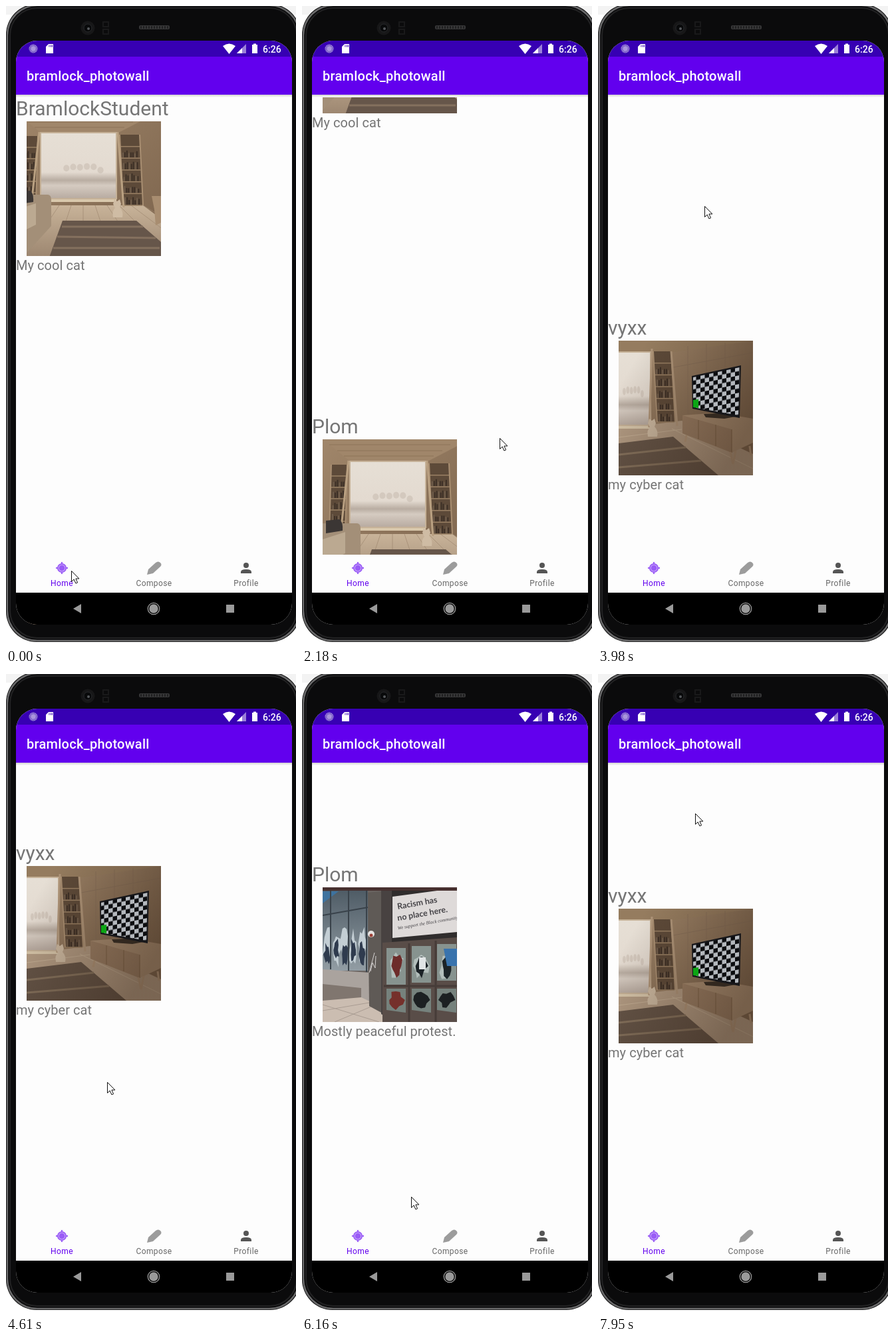
An HTML page that plays this animation: 436x960 px, repeating every 8000 ms.

```html
<!DOCTYPE html>
<html lang="en">
<head>
<meta charset="utf-8">
<title>Photo feed</title>
<style>
  html, body { margin: 0; width: 100%; height: 100%; overflow: hidden; background: #fff; }
  svg { display: block; width: 100vw; height: 100vh; }
  text { font-family: Roboto, sans-serif; }
  .user { font-size: 30px; fill: #757575; }
  .caption { font-size: 20px; letter-spacing: .06px; fill: #757575; }
  .tab { font-size: 12px; letter-spacing: .4px; text-anchor: middle; fill: #666; }
  .sign { font-family: Lato, sans-serif; font-weight: 700; font-size: 12.4px; fill: #454347; }
  .small { font-family: "Liberation Serif", serif; font-style: italic; font-size: 7px; fill: #454347; }
</style>
</head>
<body>
<svg viewBox="0 0 436 960" xmlns="http://www.w3.org/2000/svg">
  <defs>
    <linearGradient id="shade" x2="0" y2="1">
      <stop stop-color="#d0d0d0"/><stop offset="1" stop-color="#fdfdfd"/>
    </linearGradient>
    <linearGradient id="view" x2="0" y2="1">
      <stop stop-color="#e6dfd5"/><stop offset=".6" stop-color="#e3dad0"/>
      <stop offset=".72" stop-color="#b9ada2"/><stop offset=".8" stop-color="#d5cbc1"/>
      <stop offset="1" stop-color="#b7aaa0"/>
    </linearGradient>
    <linearGradient id="wood" x2="1" y2="1">
      <stop stop-color="#a0866a"/><stop offset="1" stop-color="#7b634c"/>
    </linearGradient>
    <linearGradient id="floor" x2="0" y2="1">
      <stop stop-color="#c8b399"/><stop offset="1" stop-color="#9c8670"/>
    </linearGradient>
    <linearGradient id="dusk" x2="1" y2=".6">
      <stop offset=".15" stop-color="#2b1a0e" stop-opacity="0"/><stop offset="1" stop-color="#2b1a0e" stop-opacity=".42"/>
    </linearGradient>
    <linearGradient id="glass" x2="0" y2="1">
      <stop stop-color="#4f5c66"/><stop offset="1" stop-color="#929da4"/>
    </linearGradient>
    <pattern id="checks" width="13" height="13" patternUnits="userSpaceOnUse" patternTransform="matrix(1 -.21 0 1 110 54)">
      <path fill="#0b0c0f" d="M0 0h13v13H0z"/><path fill="#b4b8bd" d="M0 0h6.5v6.5H0zM6.5 6.5H13V13H6.5z"/>
    </pattern>
    <clipPath id="screen"><rect x="15" y="52" width="415" height="876" rx="32"/></clipPath>
    <clipPath id="photo"><rect width="202" height="202"/></clipPath>
  </defs>

  <path fill="#f3f3f3" d="M0 0h436v13H0z"/>
  <rect y="-3" width="443" height="957" rx="46" fill="#111"/>
  <rect x="2" y="-1" width="439" height="953" rx="45" fill="#0b0b0c" stroke="#6a6a6b" stroke-width="2.500"/>
  <rect x="6" y="3" width="431" height="945" rx="41" fill="none" stroke="#222223" stroke-width="2"/>
  <circle cx="123" cy="33" r="10.500" fill="#171718"/>
  <circle cx="123" cy="33" r="6" fill="#08090a" stroke="#28292c"/>
  <circle cx="124" cy="34" r="2" fill="#55585c"/>
  <path fill="none" stroke="#19191a" stroke-width="2" d="M146 24h8v7h-8zM146 35h8v7h-8z"/>
  <rect x="200" y="29" width="46" height="6" rx="2" fill="#373738"/>
  <path stroke="#202021" stroke-dasharray="2 2" d="M202 32h42" stroke-width="4"/>

  <g clip-path="url(#screen)">
    <path fill="#fdfdfd" d="M15 52h415v876H15z"/>
    <g id="feed"></g>
    <path fill="url(#shade)" d="M15 133h415v4H15z"/>
    <path fill="#3700b3" d="M15 52h415v24H15z"/>
    <path fill="#6200ee" d="M15 76h415v57H15z"/>
    <path fill="#fdfdfd" d="M15 823h415v57H15z"/>
    <path d="M15 880h415v48H15z"/>

    <circle cx="41" cy="64" r="6.500" fill="#a995dc"/>
    <circle cx="41" cy="64" r="5" fill="none" stroke="#5b35bd" stroke-dasharray="1 1.2" stroke-width="3"/>
    <path fill="#fff" d="M64 57h7v14H60V61z"/>
    <path stroke="#3700b3" d="M65 58.500v3M67.500 58.500v3M69.500 58.500v3"/>
    <path fill="#fff" d="M326 60q9.500-7 19 0l-9.500 12zM370 58h2v-1.500h4V58h2v13h-8z"/>
    <path fill="#9b80d9" d="M361 57v14h-14z"/><path fill="#fff" d="M355 63v8h-8z"/>
    <text x="386" y="69.500" font-size="14" font-weight="500" fill="#fff">6:26</text>
    <text x="31" y="112" font-size="20" font-weight="500" letter-spacing=".25" fill="#fff">bramlock_photowall</text>

    <g fill="none" stroke="#9a5cf6">
      <path stroke-width="2" d="M84 834v18M75 843h18"/>
      <circle cx="84" cy="843" r="6.200" fill="#c9a9fb" stroke-width="1.800"/>
      <circle cx="84" cy="843" r="4.300" fill="#9a5cf6" stroke="none"/>
    </g>
    <path fill="#9c9c9c" d="M212 853l2-8 11-10q4-3 7 0t0 6l-11 10z"/>
    <circle cx="361" cy="839" r="4" fill="#555"/>
    <path fill="#555" d="M353 851v-2q0-4 8-4t8 4v2z"/>
    <text class="tab" x="84" y="869.500" style="fill:#6200ee">Home</text>
    <text class="tab" x="222.500" y="869.500">Compose</text>
    <text class="tab" x="361" y="869.500">Profile</text>

    <path fill="#9a9a9a" d="M113 897v14l-12-7zM331 898h12v12h-12z"/>
    <circle cx="222" cy="904" r="6.700" fill="#9a9a9a"/>
    <circle cx="222" cy="904" r="8.700" fill="none" stroke="#9a9a9a" stroke-width="1.300"/>
  </g>
  <path id="cursor" fill="#fff" stroke="#111" d="M.5.500v16l3.700-3.500 2.700 6 2.700-1.100-2.700-5.900h5z"/>
</svg>
<script>
const shape = (d, fill, extra = '') => `<path d="${d}" fill="${fill}" ${extra}/>`;
const lines = (d, color, width = 1) => shape(d, 'none', `stroke="${color}" stroke-width="${width}"`);
const repeat = (n, make) => Array.from({ length: n }, (_, i) => make(i)).join('');
const random = seed => Math.abs(Math.sin(seed * 127.1) * 437.5) % 1;

function bookcase(x, y, w, h, lean) {
  const rows = 6, gap = h / rows;
  const shelf = r => {
    const left = x + lean * r / rows, base = y + (r + 1) * gap;
    const book = b => {
      const tall = gap * (.4 + .3 * random(r * 9 + b));
      return shape(`M${left + 3 + b * 3} ${base - tall}h2v${tall - 1}h-2z`, b % 3 ? '#3d3027' : '#6e5c4b');
    };
    return (r ? repeat(Math.floor(w / 3) - 2, book) : '') + lines(`M${left} ${base}h${w}`, '#9a8064', 1.5);
  };
  return shape(`M${x} ${y}h${w}l${lean} ${h}h${-w}z`, '#5d4a39') + repeat(rows, shelf) +
    lines(`M${x} ${y}l${lean} ${h}m${w} 0l${-lean} ${-h}`, '#a98f72', 2);
}

const outlook = (x, y, w, h) =>
  `<rect x="${x}" y="${y}" width="${w}" height="${h}" fill="url(#view)" stroke="#c5b197" stroke-width="2"/>` +
  repeat(6, i => `<ellipse cx="${x + w * (.34 + i * .09)}" cy="${y + h * (.5 + .07 * random(i + 1))}" rx="${w * .04}" ry="${h * .05}" fill="#cdc2b7" opacity=".7"/>`) +
  lines(`M${x} ${y + h + 3}h${w}`, '#d9c8ac', 4);

const cat = (x, y) => shape(`M${x - 6} ${y + 14}q-2-10 3-14l-3-6 2-7 4 3 4-3 2 7-2 5q6 6 4 15z`, '#cfbca4');

const planks = (top, center) => lines(repeat(11, i => `M${center + (i - 5) * 18} ${top}L${center + (i - 5) * 44} 220`), '#9f8970', .7);

// One room serves two photos, cropped at different offsets.
const livingRoom = (x, y) => `<g transform="translate(${-x} ${-y})">` +
  shape('M0 0h222v220H0z', 'url(#wood)') +
  shape('M0 0h222l-62 32H40z', '#a0866a') + lines('M10 8h182M22 17h158M32 25h135', '#8d7458') +
  shape('M0 142h195l27 20v58H0z', 'url(#floor)') + planks(142, 105) +
  outlook(41, 33, 114, 99) +
  bookcase(13, 38, 24, 102, -3) + bookcase(160, 36, 30, 106, 5) +
  lines('M39 32L28 132M157 32l9 113', '#b9a081', 3) +
  shape('M208 128h14v40l-8 4-2-24z', '#a88d70') +
  shape('M0 126h52q5 1 5 7v40L14 220H0z', '#a38f78') + shape('M0 150l34-11v32L0 188z', '#bba991') +
  shape('M5 122l20-2q6 3 5 17l-25 4z', '#3b3634') +
  shape('M74 165h111l37 32v23H54z', '#66564a') + lines('M73 174h122M66 189l148 2M60 206h160', '#84705e', 3) +
  cat(156, 146) + '</g>';

const tvRoom = () =>
  shape('M0 0h202v202H0z', 'url(#wood)') + shape('M0 0h202L85 17H0z', '#957c5f') +
  lines('M104 8v118M132 5v110M160 3v115M82 40L202 18', '#88705a') +
  shape('M0 132l95-12 107 50v32H0z', '#b39c84') + lines('M0 145l95-12M80 132l122 60', '#c6b197') +
  outlook(-12, 17, 60, 110) + bookcase(52, 16, 27, 106, 6) +
  lines('M50 12l-4 118M79 16l9 112', '#b0967a', 3) +
  shape('M96 112l55-4 51 9v36l-32 15-74-29z', '#ac9175') + shape('M96 112l74 21v35l-74-29z', '#9c8066') +
  lines('M120 119v29M146 126v32M170 133v35', '#7e6449') + lines('M102 142l-2 10M168 167l4 18 4-20M197 158l2 14', '#b3977a', 3) +
  shape('M0 154l82-10 68 58H0z', '#655548') + lines('M0 171l101-11M0 190l124-10', '#87745f', 3) + cat(50, 130) +
  shape('M0 0h202v202H0z', 'url(#dusk)') +
  shape('M128 110l40-2 13 5-22 4-28-2z', '#32281f') +
  shape('M110 53l74-16-2 79-71-14z', '#17171a') + shape('M112 55l70-15-2 72-68-12z', 'url(#checks)') +
  shape('M112 89l8-1v13l-8-1z', '#0ca514');

function jagged(x, y, rx, ry, fill) {
  const corner = i => {
    const reach = .45 + .55 * random(x + y + i), angle = i * Math.PI / 6;
    return `${i ? 'L' : 'M'}${x + rx * reach * Math.cos(angle)} ${y + ry * reach * Math.sin(angle)}`;
  };
  return shape(repeat(12, corner) + 'z', fill);
}

const doorPane = i => {
  const x = 96 + i * 38;
  return shape(`M${x} ${91 - i * 3}h29v55h-29z`, '#87938f') + shape(`M${x} 152h29v36l-29-4z`, '#76827d') +
    jagged(x + 14, 118, 14, 23, '#b3bebb') + jagged(x + 15, 118, 11, 20, i ? '#1c2327' : '#6d2c2b') +
    jagged(x + 14, 169, 14, 15, i ? '#1c2022' : '#75302b');
};

const storefront = () =>
  shape('M0 0h202v202H0z', '#696360') + shape('M0 5h68v120H0z', 'url(#glass)') + shape('M0 6h24L0 24z', '#3e739f') +
  repeat(5, i => jagged(7 + i * 13, 85 + i % 2 * 8, 8, 32, '#c3ced4') + jagged(7 + i * 13, 100 - i % 2 * 6, 6, 20, '#2f3b4e')) +
  lines('M12 5v118M39 5v120M66 5v122M0 42l68-12', '#39424a', 2) +
  shape('M0 123l70 5v48L0 158z', '#aaa39e') + shape('M0 145l58 6v18L0 180z', '#80766f') +
  shape('M0 170l58-5 32 15 28 22H0z', '#cbbdb1') + lines('M0 185l70-12M18 202l62-26M0 176l85 26', '#a99c92') +
  shape('M68 8l20-2 4 184-22-12z', '#5f5a56') + shape('M88 5h18v195l-18-10z', '#484241') +
  shape('M104 5h98v80h-98z', '#302d2d') + shape('M90 83l112-8v127H90z', '#594d48') +
  repeat(3, doorPane) + shape('M182 92h20v26h-15z', '#3973ad') + shape('M145 105h10v18h-10z', '#e0e4e5') +
  lines('M130 84v118M170 80v122M92 148h110', '#463c38', 3) + lines('M70 128l8-30M72 126l3-13 4 8 1-18', '#d5d2d1') +
  '<circle cx="73" cy="70" r="5" fill="#e7e5e3"/><circle cx="73" cy="72" r="2.500" fill="#9d4036"/>' +
  shape('M105 14L202 1v66l-97 9z', '#dedad9') +
  `<g transform="translate(113 33) rotate(-10)"><text class="sign">Racism has</text>
   <text class="sign" x="-3" y="17">no place here.</text><text class="small" x="-5" y="30">We support the Black community</text></g>` +
  shape('M0 0h202v5H0z', '#47302f');

const posts = [
  ['BramlockStudent', 'My cool cat', livingRoom(20, 16)],
  ['Plom', 'Great View!!!', livingRoom(0, 0)],
  ['vyxx', 'my cyber cat', tvRoom()],
  ['Plom', 'Mostly peaceful protest.', storefront()]
];
const feed = document.getElementById('feed');
const cursor = document.getElementById('cursor');
feed.innerHTML = posts.map(([user, caption, photo], i) => `<g transform="translate(0 ${173 + i * 691})">
  <text class="user" x="15" y="-9">${user}</text>
  <g transform="translate(31)" clip-path="url(#photo)">${photo}</g>
  <text class="caption" x="15" y="223">${caption}</text></g>`).join('');

// Times are counted in screen refreshes; each pose is held for one.
const REFRESH = 130.3, LEAD = 35;

// Turning points of the pointer: time, x, y.
const turns = [
  [0, 98, 847], [5, 225, 338], [7, 241, 500], [13, 291, 276], [17, 297, 648], [19, 289, 337],
  [20, 77, 783], [23, 120, 548], [26, 147, 747], [30, 160, 300], [35, 152, 612], [38, 160, 349],
  [42, 115, 811], [45, 130, 560], [47, 164, 784], [48, 237, 911], [51, 149, 403], [53, 240, 856],
  [57, 251, 233], [59, 185, 707], [60, 146, 149], [61, 146, 209]
];

// Each swipe slows the feed down to its resting place.
const swipes = [
  { at: 7, lasts: 6, rest: 214 },
  { at: 21, lasts: 5, rest: 573 },
  { at: 26, lasts: 9, rest: 1267 },
  { at: 35, lasts: 7, rest: 1902 },
  { at: 42, lasts: 4, rest: 2073 },
  { at: 46, lasts: 5, rest: 1665 },
  { at: 51, lasts: 3, rest: 1203 }
];

const clamp = v => Math.min(1, Math.max(0, v));
const easeOut = p => p * (2 - p);
const mix = (a, b, p) => Math.round(a + (b - a) * p);

function pointerAt(tick) {
  const next = Math.max(1, turns.findIndex(turn => turn[0] >= tick));
  const [t0, x0, y0] = turns[next - 1], [t1, x1, y1] = turns[next];
  const p = (tick - t0) / (t1 - t0);
  return [mix(x0, x1, p), mix(y0, y1, p)];
}

const scrollAt = tick => swipes.reduce((pos, { at, lasts, rest }) => mix(pos, rest, easeOut(clamp((tick - at) / lasts))), 0);

const start = performance.now();
function render(now) {
  const time = Math.max(0, now - start) % 8000;
  const tick = Math.min(61, Math.floor((time + LEAD) / REFRESH));
  cursor.setAttribute('transform', `translate(${pointerAt(tick).join(' ')})`);
  feed.setAttribute('transform', `translate(0 ${-scrollAt(tick)})`);
  requestAnimationFrame(render);
}
render(start);
</script>
</body>
</html>
```
